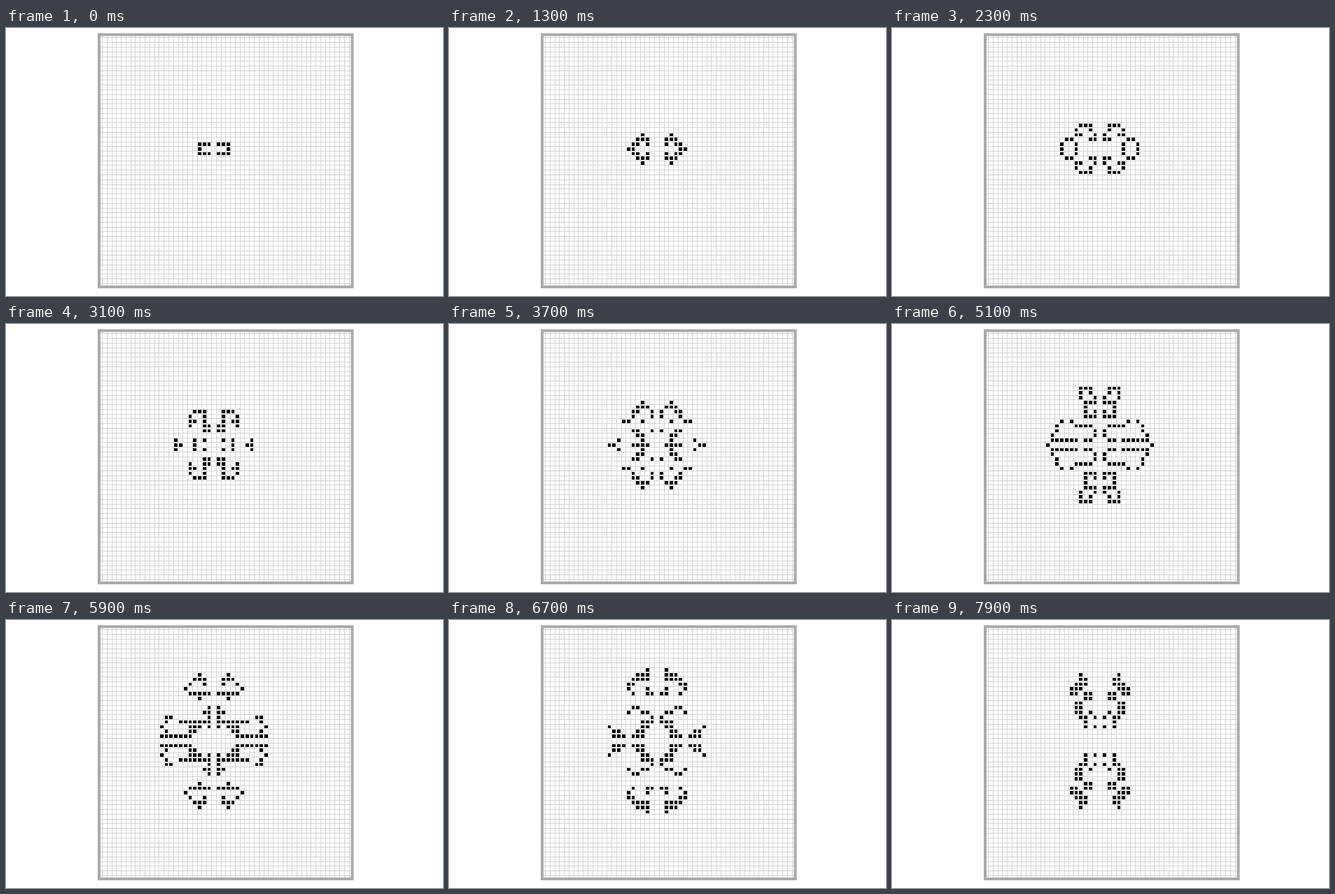
An HTML page with a canvas for the animation above (8000 ms loop, 624 px wide and 384 px high).

```html
<!DOCTYPE html>
<html lang="en">
<head>
<meta charset="utf-8">
<title>Game of Life</title>
<style>
  html, body { margin: 0; width: 100%; height: 100%; overflow: hidden; background: #fff; }
  canvas { display: block; }
</style>
</head>
<body>
<canvas id="stage" width="624" height="384"></canvas>
<script>
const ctx = document.getElementById('stage').getContext('2d');

const SIZE = 54, PITCH = 6.78, CELL = 4.69;
const LEFT = 130.74, TOP = 7.14;
const LOOP = 8000, STEP = 200, LEAD = 100;
const GENERATIONS = LOOP / STEP;
const SEED = ['###.###', '#.....#', '###.###'];
const SEED_X = 21, SEED_Y = 23;

const emptyBoard = () => Array.from({ length: SIZE }, () => Array(SIZE).fill(0));

function seedBoard() {
  const board = emptyBoard();
  SEED.forEach((row, y) => [...row].forEach((c, x) => {
    board[SEED_Y + y][SEED_X + x] = c === '#' ? 1 : 0;
  }));
  return board;
}

function countNeighbours(board, x, y) {
  let count = -board[y][x];
  for (let dy = -1; dy <= 1; dy++)
    for (let dx = -1; dx <= 1; dx++)
      count += board[y + dy]?.[x + dx] || 0;
  return count;
}

function evolve(board) {
  return board.map((row, y) => row.map((alive, x) => {
    const n = countNeighbours(board, x, y);
    return n === 3 || (alive && n === 2) ? 1 : 0;
  }));
}

const history = [seedBoard()];
while (history.length <= GENERATIONS) history.push(evolve(history.at(-1)));

// Edges snap to whole pixels so cells stay crisp.
function fillCell(x, y) {
  const inset = (PITCH - CELL) / 2;
  const x0 = LEFT + x * PITCH + inset, y0 = TOP + y * PITCH + inset;
  const px = Math.round(x0), py = Math.round(y0);
  ctx.fillRect(px, py, Math.round(x0 + CELL) - px, Math.round(y0 + CELL) - py);
}

function drawGrid() {
  ctx.fillStyle = '#d4d4d4';
  for (let i = 1; i < SIZE; i++) {
    ctx.fillRect(Math.floor(LEFT + i * PITCH), 9, 1, 362);
    ctx.fillRect(133, Math.floor(TOP + i * PITCH), 362, 1);
  }
  ctx.strokeStyle = '#aaa';
  ctx.lineWidth = 4;
  ctx.strokeRect(133, 9.5, 361.5, 361.5);
}

function draw(board) {
  ctx.fillStyle = '#fff';
  ctx.fillRect(0, 0, 624, 384);
  drawGrid();
  ctx.fillStyle = '#000';
  board.forEach((row, y) => row.forEach((alive, x) => alive && fillCell(x, y)));
}

const start = performance.now();
let shown = -1;

function tick() {
  const time = (performance.now() - start) % LOOP;
  const generation = Math.floor((time + LEAD) / STEP);
  if (generation !== shown) draw(history[shown = generation]);
  requestAnimationFrame(tick);
}
tick();
</script>
</body>
</html>
```
